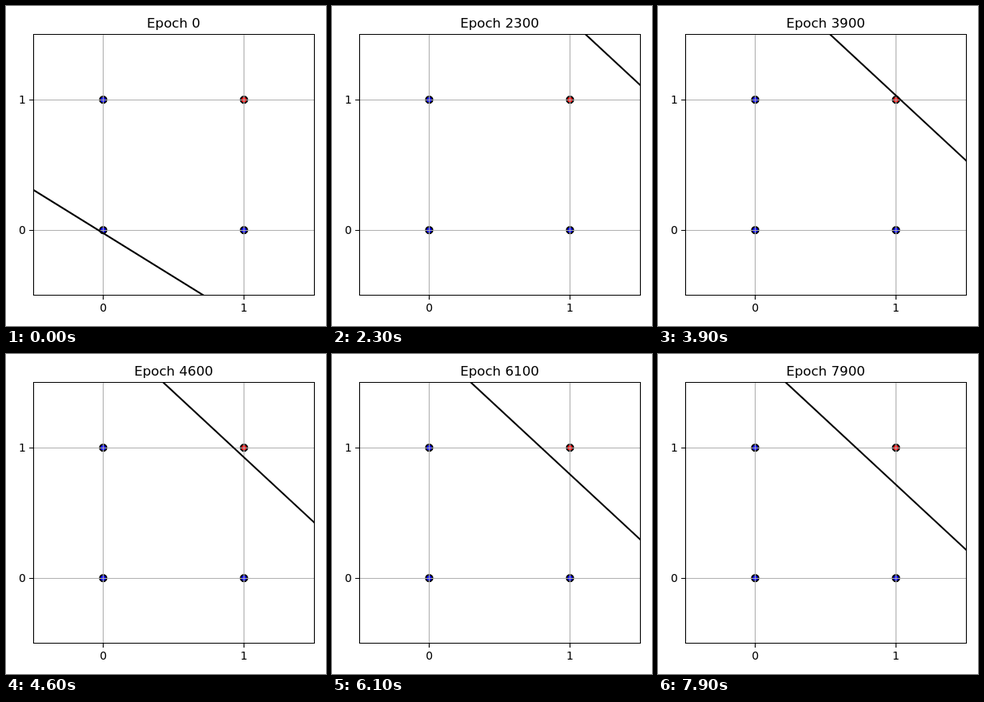
Animation, 400 px wide and 400 px high, one loop 8 s. Source, as an HTML page:

```html
<!DOCTYPE html>
<html>
<head>
<meta charset="utf-8">
<style>
  html, body { margin: 0; width: 100%; height: 100%; overflow: hidden; background: #fff; }
  svg { display: block; font: 13.89px "DejaVu Sans", sans-serif; }
  .grid { stroke: #b0b0b0; stroke-width: 1.11; }
  .axis { fill: none; stroke: #000; stroke-width: 1.11; }
  .dot { stroke: #000; stroke-width: 2; }
  .mid { text-anchor: middle; }
  .end { text-anchor: end; }
</style>
</head>
<body>
<svg width="400" height="400" viewBox="0 0 400 400">
  <clipPath id="plot"><rect x="34" y="35" width="351" height="326"/></clipPath>
  <g class="dot" fill="#00f">
    <circle cx="121.5" cy="117.2" r="4.17"/>
    <circle cx="121.5" cy="280.2" r="4.17"/>
    <circle cx="297.5" cy="280.2" r="4.17"/>
    <circle cx="297.5" cy="117.2" r="4.17" fill="#f00"/>
  </g>
  <path class="grid" d="M121.5 36V361M297.5 36V361M35 117.5H385M35 280.5H385"/>
  <g clip-path="url(#plot)"><line id="boundary" stroke="#000" stroke-width="2.08"/></g>
  <path class="axis" d="M34.5 35.5H385.5V361.5H34.5ZM121.5 362v4.9M297.5 362v4.9M34 117.5h-4.9M34 280.5h-4.9"/>
  <text class="mid" x="121.7" y="382">0</text>
  <text class="mid" x="297.4" y="382">1</text>
  <text class="end" x="24.8" y="122">1</text>
  <text class="end" x="24.8" y="285">0</text>
  <text class="mid" id="title" x="209.5" y="27.2" font-size="16.67"></text>
</svg>
<script>
const title = document.getElementById('title');
const boundary = document.getElementById('boundary');
const px = x => 121.45 + 175.7 * x;
const py = y => 279.5 - 163 * y;

// Axis intercept of the learned boundary, settling towards 1.5
function intercept(epoch) {
  const s = (epoch - 2300) / 1000;
  return 1.5 + 1 / (0.901 + s * (0.565 + 0.037 * s - 0.0032 * s * s));
}

function drawLine(slope, c) {
  const ends = { x1: -0.7, x2: 1.7 };
  for (const i of [1, 2]) {
    const x = ends['x' + i];
    boundary.setAttribute('x' + i, px(x));
    boundary.setAttribute('y' + i, py(c + slope * x));
  }
}

function frame(now) {
  const epoch = Math.floor(now % 8000 / 100) * 100;
  title.textContent = 'Epoch ' + epoch;
  // The boundary leaves the plot after the first step and returns at 1900
  boundary.style.display = epoch && epoch < 1900 ? 'none' : '';
  if (epoch) drawLine(-1, intercept(epoch));
  else drawLine(-0.668, -0.027);
  requestAnimationFrame(frame);
}
frame(0);
</script>
</body>
</html>
```
